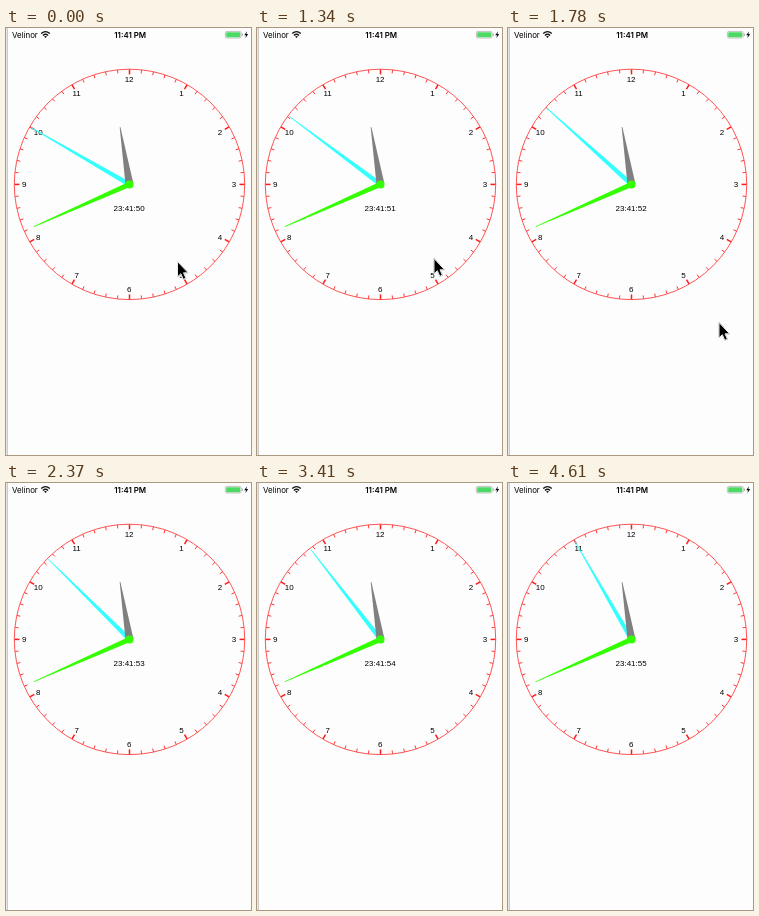
Write an HTML page that moves like this. It is 245 by 427 pixels and loops after 4.76 s.

```html
<!DOCTYPE html>
<html lang="en">
<head>
<meta charset="utf-8">
<title>Clock</title>
<style>
  html, body { margin: 0; width: 100%; height: 100%; overflow: hidden; background: #fdfdfd; }
  svg { display: block; width: 100%; height: 100%; }
  text { font: 8px "Liberation Sans", Arial, sans-serif; fill: #000; text-anchor: middle; }
  .status { font: 600 7.9px Inter, sans-serif; }
  #cursor { filter: drop-shadow(0 .6px .7px #0008); }
</style>
</head>
<body>
<svg viewBox="0 0 245 427">
  <path d="M1.2 0V427" stroke="#b4b4b4"/>

  <text class="status" x="6" y="9.6" style="text-anchor:start;font-weight:400">Velinor</text>
  <g fill="none" stroke="#111" stroke-width="1.3">
    <path d="M35.2 5.6Q39.5 1.6 43.8 5.6M36.9 7.4Q39.5 5 42.1 7.4"/>
    <path d="M38 8.5Q39.5 7.3 41 8.5L39.5 10Z" fill="#111" stroke="none"/>
  </g>
  <text class="status" x="124.2" y="9.6">11:41 PM</text>
  <rect x="219.4" y="3.4" width="15.6" height="6.6" rx="1.4" fill="none" stroke="#999" stroke-width=".6"/>
  <rect x="220.2" y="4.2" width="14" height="5" rx=".8" fill="#4cd964"/>
  <path d="M236.2 5.4v2.6" stroke="#999" stroke-width=".9"/>
  <path d="M241 3.2L238.2 7.3H240L239.4 10.2L242.2 6H240.4Z" fill="#111"/>

  <g transform="translate(123.5 156.4)">
    <circle r="115.2" fill="none" stroke="#ff2a2a" stroke-width=".8"/>
    <g id="dial" stroke="#ff1a1a"></g>
    <text id="time" x="-.4" y="27"></text>
    <g id="hands"></g>
    <circle r="4" fill="#3f0"/>
  </g>

  <path id="cursor" d="M0 -.5V14.8L3.4 11.7L5.8 17.3L8.4 16.2L6 10.8H10.6Z" stroke="#fff" stroke-width=".9"/>
</svg>
<script>
const LOOP = 4760, FRAME = 148.5;
const TICK_AT = 325, TICK_TIME = 200;
const POINTER = [[171.5, 234], [177, 231], [191, 231], [228.5, 246], [211, 295], [215, 375]];
const $ = id => document.getElementById(id);

let dial = "";
for (let i = 0; i < 60; i++) {
  const major = i % 5 === 0;
  dial += `<path d="M0 -115V${major ? -110 : -111.6}" stroke-width="${major ? 1.5 : .8}" transform="rotate(${i * 6})"/>`;
}
for (let h = 1; h <= 12; h++) {
  const a = h * Math.PI / 6;
  dial += `<text stroke="none" x="${105 * Math.sin(a) - .4}" y="${2.9 - 105 * Math.cos(a)}">${h}</text>`;
}
$("dial").innerHTML = dial;

const hand = (id, width, length, color, angle) =>
  `<path id="${id}" d="M${-width} 0L-.35 ${-length}H.35L${width} 0Z" fill="${color}" transform="rotate(${angle})"/>`;
$("hands").innerHTML =
  hand("second", 2.4, 114, "#3ff", 0) +
  hand("hour", 4, 58, "#808080", 350.6) +
  hand("minute", 2.6, 104.6, "#3f0", 246.2);

// The second hand eases out into each new second.
function secondsAt(t) {
  const n = Math.floor((t - TICK_AT) / 1000);
  const x = Math.min(1, (t - TICK_AT - n * 1000) / TICK_TIME);
  return 50 + n + x * (2 - x);
}

function draw(now) {
  const frame = Math.floor((now % LOOP + 8) / FRAME);
  const s = secondsAt(frame * FRAME);
  $("second").setAttribute("transform", `rotate(${s * 6})`);
  $("time").textContent = "23:41:" + Math.floor(s + .6);

  // The pointer nudges once, rests, then sweeps away one point per frame.
  const p = POINTER[frame && Math.max(1, frame - 8)];
  $("cursor").setAttribute("visibility", p ? "visible" : "hidden");
  if (p) $("cursor").setAttribute("transform", `translate(${p})`);
}

const start = performance.now();
function tick() {
  draw(performance.now() - start);
  requestAnimationFrame(tick);
}
tick();
</script>
</body>
</html>
```
